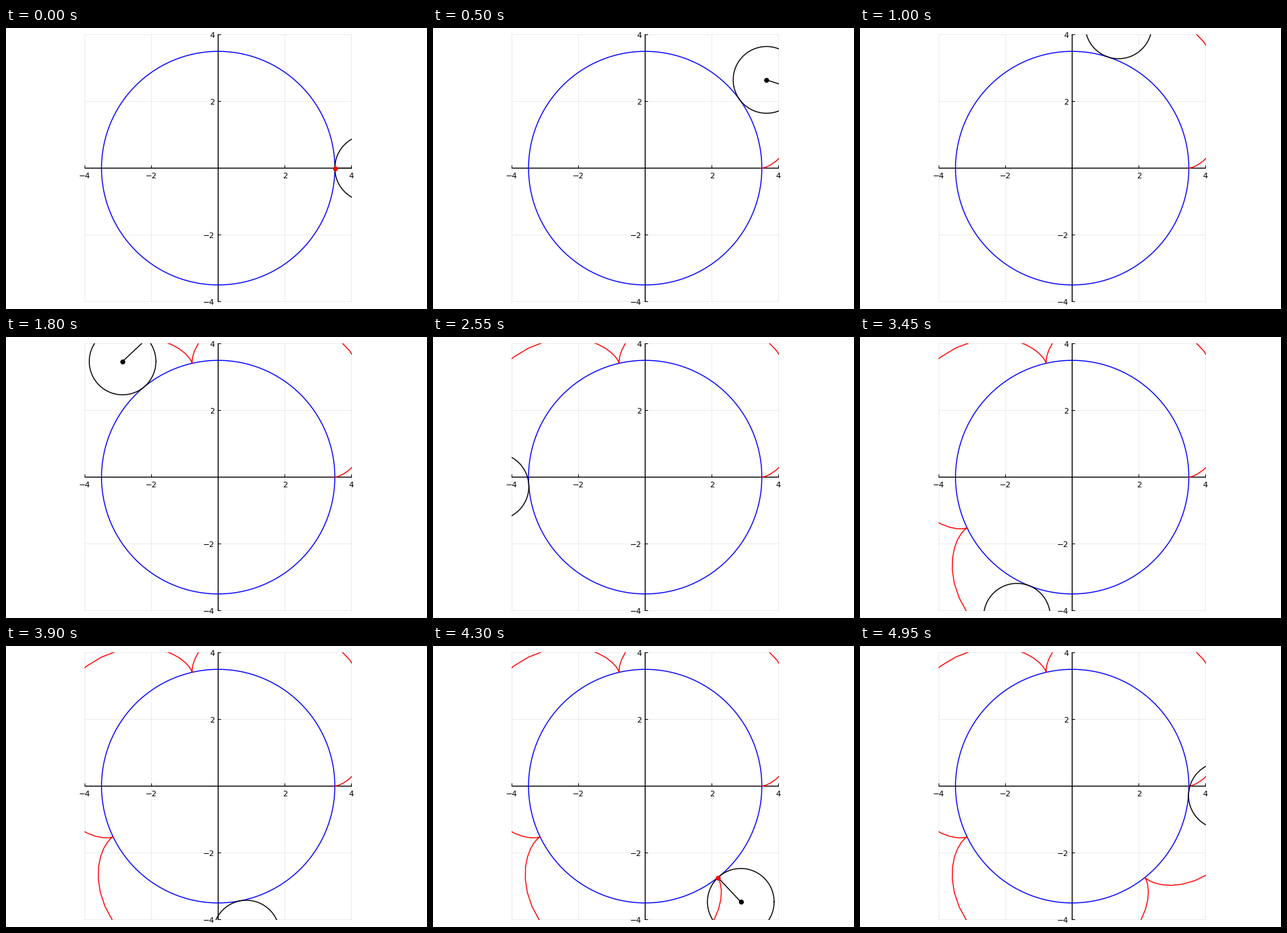
These frames come from a looping animation (600 by 400 pixels, 5 s). A matplotlib script:

```python
import numpy as np
import matplotlib.pyplot as plt
from matplotlib.animation import FuncAnimation
from matplotlib.transforms import Bbox, TransformedBbox

plt.rcParams["font.family"] = "DejaVu Sans"

W, H, DPI = 600, 400, 100
UNIT = 47.5               # pixels per data unit
CX, CY = 302.4, 199.5     # pixel position of the origin
FRAMES, INTERVAL = 100, 50
BIG, SMALL, LIM = 3.5, 1.0, 4
PX = 72 / DPI             # one pixel in points

fig = plt.figure(figsize=(W / DPI, H / DPI), dpi=DPI, facecolor="white")
ax = fig.add_axes([0, 0, 1, 1])
ax.set_xlim(-CX / UNIT, (W - CX) / UNIT)
ax.set_ylim((CY - H) / UNIT, CY / UNIT)
ax.axis("off")

# Plot area, rounded outwards to whole pixels
area = TransformedBbox(
    Bbox([[(112 - CX) / UNIT, (CY - 390) / UNIT],
          [(493 - CX) / UNIT, (CY - 9) / UNIT]]), ax.transData)


def line(x, y, color="black", width=1.39, z=2, **kw):
    art, = ax.plot(x, y, color=color, lw=width * PX, zorder=z, snap=False, **kw)
    art.set_clip_box(area)
    return art


def dot(color, z):
    return line([], [], color, z=z, marker="o", ms=7 * PX, mew=0, ls="none")


def circle(radius):
    a = np.linspace(0, 2 * np.pi, 201)
    return radius * np.cos(a), radius * np.sin(a)


def draw_axes():
    tick = 3.5 / UNIT
    for v in (-4, -2, 2, 4):
        line([v, v], [-LIM, LIM], width=0.7, z=0, alpha=0.1)
        line([-LIM, LIM], [v, v], width=0.7, z=0, alpha=0.1)
        line([v, v], [0, tick], width=1, z=1)
        line([0, tick], [v, v], width=1, z=1)
        label = str(v).replace("-", "\u2212")
        ax.text(v, -14.7 / UNIT, label, size=8, ha="center", va="baseline")
        ax.text(-5 / UNIT, v - 4.7 / UNIT, label, size=8, ha="right", va="baseline")
    line([-LIM, LIM], [0, 0], z=1)
    line([0, 0], [-LIM, LIM], z=1)


draw_axes()
line(*circle(BIG), color="blue", z=2)
trace = line([], [], "red", z=3)
wheel = line([], [], z=4)
arm = line([], [], z=5)
hub = dot("black", 6)
pen = dot("red", 7)

# Wheel rolling around the outside of the big circle
theta = 2 * np.pi * np.arange(FRAMES) / FRAMES
reach = BIG + SMALL
spin = theta * reach / SMALL
hub_x, hub_y = reach * np.cos(theta), reach * np.sin(theta)
pen_x, pen_y = hub_x - SMALL * np.cos(spin), hub_y - SMALL * np.sin(spin)
rim_x, rim_y = circle(SMALL)


def update(i):
    trace.set_data(pen_x[:i + 1], pen_y[:i + 1])
    wheel.set_data(hub_x[i] + rim_x, hub_y[i] + rim_y)
    arm.set_data([hub_x[i], pen_x[i]], [hub_y[i], pen_y[i]])
    hub.set_data([hub_x[i]], [hub_y[i]])
    pen.set_data([pen_x[i]], [pen_y[i]])
    return trace, wheel, arm, hub, pen


anim = FuncAnimation(fig, update, frames=FRAMES, interval=INTERVAL, repeat=True)
plt.show()
```
